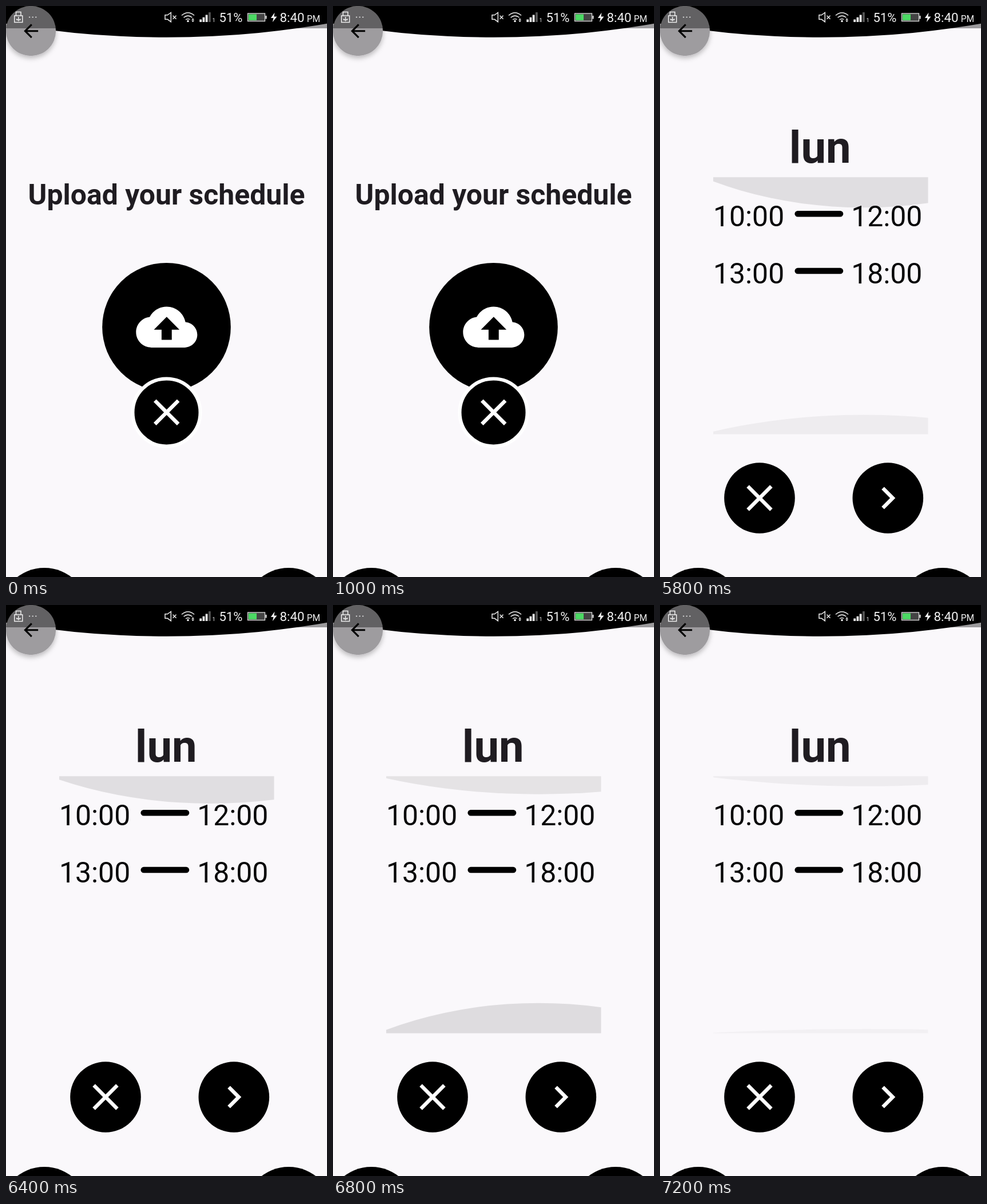
Write an HTML page that moves like this. It is 561 px wide and 998 px high and loops after 8000 ms.

```html
<!DOCTYPE html>
<html lang="en">
<head>
<meta charset="utf-8">
<title>Upload your schedule</title>
<style>
  html, body { margin: 0; width: 100%; height: 100%; overflow: hidden; background: #faf8fb; }
  svg { display: block; width: 100%; height: 100%; font-family: Roboto, sans-serif; }
  .title { font-weight: 700; fill: #1f1c21; text-anchor: middle; }
  .time { font-size: 49.87px; fill: #070708; }
  .dash { stroke: #000; stroke-width: 10.5; stroke-linecap: round; }
  .line { fill: none; stroke: #eee; stroke-width: 1.5; }
  .status { fill: #f2f2f2; }
</style>
</head>
<body>
<svg viewBox="0 0 561 998">
  <defs>
    <path id="close" fill="#fff" transform="scale(3.245) translate(-12 -12)" d="M19 6.41 17.59 5 12 10.59 6.41 5 5 6.41 10.59 12 5 17.59 6.41 19 12 13.41 17.59 19 19 17.59 13.41 12z"/>
    <clipPath id="list"><rect x="93" y="299.3" width="375.5" height="449.2"/></clipPath>
    <filter id="shadow" x="-30%" y="-30%" width="160%" height="170%">
      <feDropShadow dx="0" dy="4" stdDeviation="4.5" flood-opacity=".26"/>
    </filter>
  </defs>

  <rect width="561" height="998" fill="#faf8fb"/>
  <circle cx="280.5" cy="-1590.2" r="1645"/>
  <circle cx="67" cy="1060" r="78"/>
  <circle cx="494" cy="1060" r="78"/>

  <g id="upload">
    <text class="title" x="280.5" y="346.5" font-size="49.87">Upload your schedule</text>
    <circle cx="280.5" cy="561.2" r="112.3"/>
    <path fill="#fff" transform="translate(280.8 561.2) scale(4.46) translate(-12 -12)" d="M19.35 10.04C18.67 6.59 15.64 4 12 4 9.11 4 6.6 5.64 5.35 8.04 2.34 8.36 0 10.91 0 14c0 3.31 2.69 6 6 6h13c2.76 0 5-2.24 5-5 0-2.64-2.05-4.78-4.65-4.96zM14 13v4h-4v-4H7l5-5 5 5h-3z"/>
    <circle cx="280.5" cy="710.4" r="59" stroke="#fff" stroke-width="6"/>
    <use href="#close" x="280.7" y="710.2"/>
  </g>

  <g id="schedule" visibility="hidden">
    <text class="title" x="279.7" y="273.8" font-size="77.9">lun</text>
    <text class="time" x="93" y="384.8">10:00</text>
    <text class="time" x="334.2" y="384.8">12:00</text>
    <path class="dash" d="M240.7 363.3H315"/>
    <text class="time" x="93" y="484.6">13:00</text>
    <text class="time" x="334.2" y="484.6">18:00</text>
    <path class="dash" d="M240.7 463.1H315"/>
    <g clip-path="url(#list)">
      <ellipse id="topGlow"/>
      <ellipse id="bottomGlow"/>
    </g>
    <circle cx="174" cy="860" r="61.8"/>
    <use href="#close" x="174" y="860"/>
    <circle cx="398.3" cy="860" r="61.8"/>
    <path fill="#fff" transform="translate(398.3 860) scale(3.245) translate(-12 -12)" d="M10 6 8.59 7.41 13.17 12l-4.58 4.59L10 18l6-6z"/>
  </g>

  <circle cx="43.5" cy="43.5" r="43.7" fill="#9e9c9f" filter="url(#shadow)"/>
  <path transform="translate(43.7 43.7) scale(1.558) translate(-12 -12)" d="M20 11H7.83l5.59-5.59L12 4l-8 8 8 8 1.41-1.41L7.83 13H20v-2z"/>
  <rect width="561" height="39" opacity=".38"/>

  <g class="status">
    <path class="line" d="M17.5 17v-6.5H26V17M14.8 17h14v11.5h-14zM21.8 19v7.5M18.8 22.2v2h6v-2"/>
    <path class="line" stroke-dasharray="2.2 3.4" d="M40 19.5h14"/>
    <path class="line" d="M278 15.8h4.3l6-4.3v16.2l-6-4.4H278zM291.5 16.8l6 6M297.5 16.8l-6 6"/>
    <path class="line" d="M307 16.5Q318 7 329 16.5M310.5 20.3Q318 14 325.5 20.3M314 24Q318 20.8 322 24"/>
    <circle cx="318" cy="26.4" r="1.8"/>
    <g id="traffic">
      <path fill="#000" d="M321.5 20.8h8V29h-8z"/>
      <path d="M324.3 24.3l2.3-3 2.3 3zM324.3 25.3l2.3 3 2.3-3z"/>
    </g>
    <path d="M338.3 23.5h3.8V28h-3.8zM343.5 19.8h3.8V28h-3.8zM348.7 15.5h3.8V28h-3.8z"/>
    <path fill="#555" d="M354 11h3.8v17H354z"/>
    <text x="360.5" y="28" font-size="9">1</text>
    <text x="372.5" y="27.8" font-size="22">51%</text>
    <rect x="422.5" y="13" width="30" height="13.5" fill="#444" stroke="#ddd" stroke-width="1.3"/>
    <path fill="#4cd964" d="M424 14.5h14v10.5h-14z"/>
    <path d="M453.5 17h2v5.5h-2zM469.5 11.5 462.8 21h4.6l-1.6 7.3 7.7-9.8h-5z"/>
    <text x="478.6" y="27.8" font-size="22.3">8:40</text>
    <text x="525.7" y="27.8" font-size="15.6">PM</text>
  </g>
</svg>
<script>
  const LOOP = 8000, STEP = 200;
  const SCHEDULE = 1800, PULL = 5800, RELEASE = 6200, BOUNCE = 6600;
  const LIST = { left: 93, top: 299.3, bottom: 748.5, width: 375.4 };
  const RADIUS = LIST.width * 1.5;
  const FULL_DEPTH = LIST.width * 0.75 * (2 - Math.sqrt(3));

  const byId = id => document.getElementById(id);
  const show = (id, on) => byId(id).setAttribute('visibility', on ? 'visible' : 'hidden');

  // falls from 1 at start to 0 after span; a higher power holds longer
  const fade = (t, start, span, power) =>
    t < start ? 0 : Math.max(0, 1 - ((t - start) / span) ** power);

  // a large circle squashed vertically, so only its tip enters the list
  function drawGlow(id, edge, direction, t, depth, opacity) {
    const squash = depth / FULL_DEPTH;
    const drift = 0.7 + 0.02 * (t - PULL) / (LOOP - PULL);
    const shape = {
      cx: LIST.left + LIST.width * drift,
      cy: edge + direction * (FULL_DEPTH - RADIUS) * squash,
      rx: RADIUS,
      ry: RADIUS * squash,
      opacity
    };
    for (const name in shape) byId(id).setAttribute(name, shape[name]);
  }

  function drawTopGlow(t) {
    const pulling = t < RELEASE;
    const size = pulling
      ? 1 - 0.065 * ((RELEASE - t) / (RELEASE - PULL)) ** 2
      : fade(t, RELEASE, 1840, 1) ** 1.5;
    const strength = pulling ? 1 : fade(t, RELEASE, 1320, 2);
    drawGlow('topGlow', LIST.top, 1, t, 56.7 * size, 0.107 * strength);
  }

  function drawBottomGlow(t) {
    const rest = t < BOUNCE ? fade(t, PULL, RELEASE - PULL, 1) : 0;
    const depth = 34 * rest + 58.5 * fade(t, BOUNCE, 642, 2);
    const opacity = 0.047 * rest + 0.115 * fade(t, BOUNCE, 670, 3);
    drawGlow('bottomGlow', LIST.bottom, -1, t, depth, opacity);
  }

  function draw(time) {
    const t = time % LOOP;
    show('upload', t < SCHEDULE);
    show('schedule', t >= SCHEDULE);
    show('traffic', t < 200 || t >= 1000);
    show('topGlow', t >= PULL && t < LOOP);
    show('bottomGlow', t >= PULL);
    if (t < PULL) {
      show('topGlow', false);
      return;
    }
    // the picture advances in steps and rests after the last one
    const stepped = Math.min(Math.floor(t / STEP) * STEP, 7200);
    drawTopGlow(stepped);
    drawBottomGlow(stepped);
  }

  const begin = performance.now();
  function tick() {
    draw(performance.now() - begin);
    requestAnimationFrame(tick);
  }
  tick();
</script>
</body>
</html>
```
